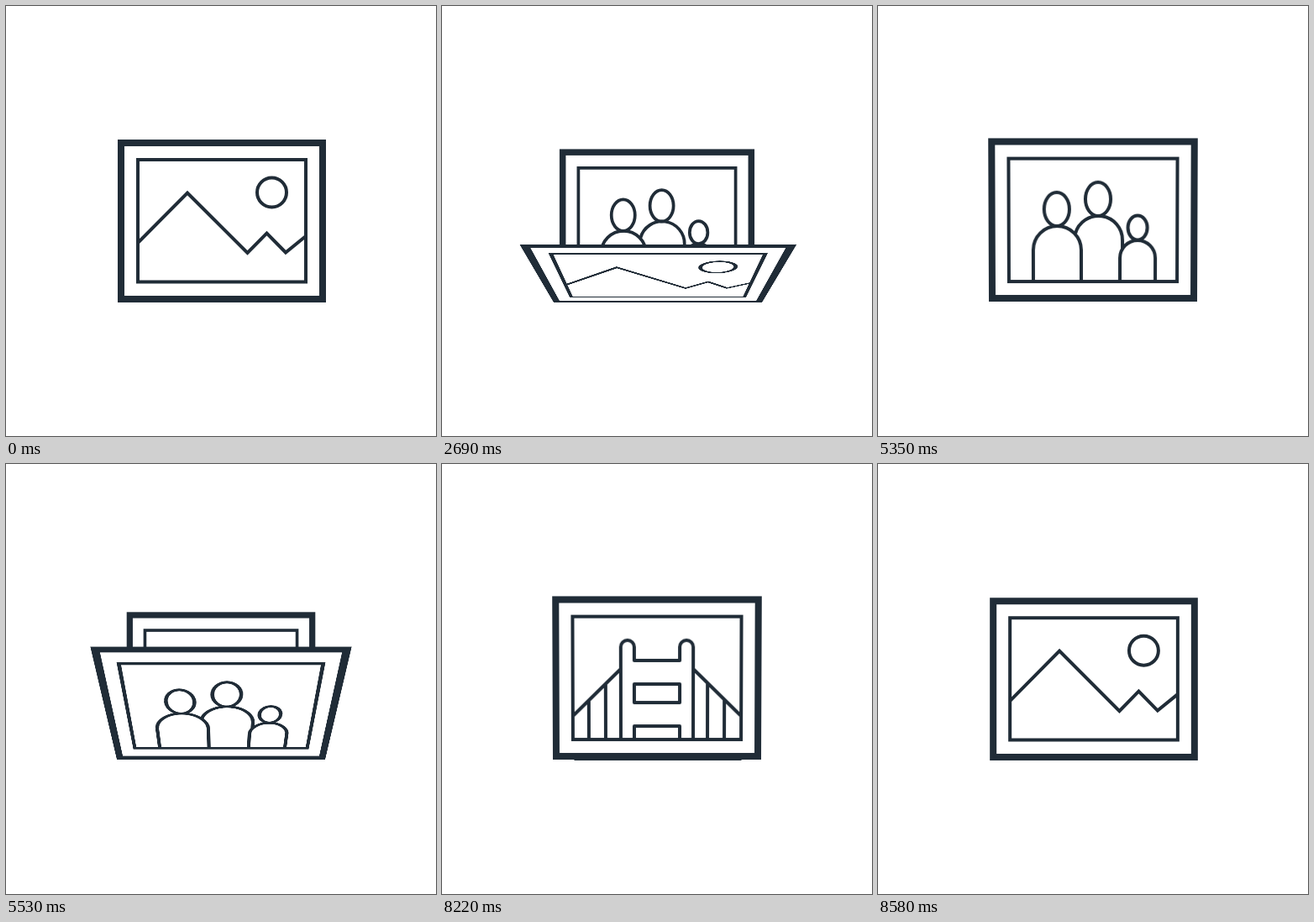
An HTML page for the animation above (8.61 s loop, 512 px wide and 512 px high).

```html
<!DOCTYPE html>
<html lang="en">
<head>
<meta charset="utf-8">
<title>Picture frames</title>
<style>
  html, body { margin: 0; width: 100%; height: 100%; overflow: hidden; background: #fff; }
  #stage {
    position: relative; width: 512px; height: 512px; overflow: hidden;
    perspective: 723px; perspective-origin: 256px 256px;
  }
  .slide {
    position: absolute; left: 0; top: 0; width: 512px; height: 512px;
    transform-origin: 256px 352px; visibility: hidden;
    fill: none; stroke: #202c37; stroke-width: 4;
  }
  #landscape { transform-origin: 257px 353px; }
  .border { fill: #fff; stroke-width: 8; }
</style>
</head>
<body>
<div id="stage">
  <svg class="slide" id="landscape" viewBox="0 0 512 512">
    <g transform="translate(1 1)">
      <rect class="border" x="136" y="162" width="240" height="186"/>
      <rect x="156" y="182" width="200" height="145.5"/>
    </g>
    <path d="M157.500 281.500L216 222.500L287.500 294L310.500 270.500L333 293.500L357 274"/>
    <circle cx="316.500" cy="222" r="17.500"/>
  </svg>

  <svg class="slide" id="family" viewBox="0 0 512 512">
    <rect class="border" x="136" y="162" width="240" height="186"/>
    <rect x="156" y="182" width="200" height="146"/>
    <ellipse cx="213" cy="242" rx="15" ry="20"/>
    <path d="M185 328V290.500a28.500 28.500 0 0 1 57 0V328"/>
    <ellipse cx="262" cy="230" rx="15" ry="20"/>
    <path d="M235 271A28.500 28.500 0 0 1 291 279V290"/>
    <ellipse cx="309" cy="264" rx="11.500" ry="14.500"/>
    <path d="M288 328V300a21 21 0 0 1 42 0V328"/>
  </svg>

  <svg class="slide" id="bridge" viewBox="0 0 512 512">
    <rect class="border" x="136" y="162" width="240" height="186"/>
    <rect x="156" y="182" width="200" height="146"/>
    <g stroke-linejoin="round">
      <path d="M213 328V218a8 8 0 0 1 16 0V234H283V218a8 8 0 0 1 16 0V328"/>
      <rect x="229" y="262" width="54" height="22"/>
      <path d="M229 328V312H283V328"/>
      <path d="M156 300L213 244M299 244L356 300"/>
      <path d="M175 281V328M195 262V328M316 261V328M336 281V328"/>
    </g>
  </svg>
</div>

<script>
const LOOP = 8610;
const STEP = 30;
const RISE_STEPS = 14;
const slides = ['landscape', 'family', 'bridge'].map(id => document.getElementById(id));

// Each turn drops one slide forward; lead is the progress already made at its first step.
const turns = [
  { start: 2450, lead: 0.4 },
  { start: 5350, lead: 1.2 },
  { start: 8220, lead: 1.2 }
];

const easeInOut = p => p < 0.5 ? 2 * p * p : 1 - 2 * (1 - p) ** 2;

function show(slide, transform, layer) {
  slide.style.visibility = 'visible';
  slide.style.transform = transform;
  slide.style.zIndex = layer;
}

function render(time) {
  for (const slide of slides) slide.style.visibility = 'hidden';

  const index = turns.findLastIndex(turn => time >= turn.start);
  if (index < 0) return show(slides[0], 'none', 1);

  const { start, lead } = turns[index];
  const steps = Math.floor((time - start) / STEP) + lead;
  const next = slides[(index + 1) % slides.length];
  if (steps >= RISE_STEPS) return show(next, 'none', 1);

  const scale = 0.8 + 0.2 * easeInOut(steps / RISE_STEPS);
  show(next, `scale(${scale})`, 1);

  const angle = 0.95 * steps * steps;
  if (angle < 86) show(slides[index], `rotateX(${-angle}deg)`, 2);
}

const begin = performance.now();
function tick() {
  render((performance.now() - begin) % LOOP);
  requestAnimationFrame(tick);
}
tick();
</script>
</body>
</html>
```
